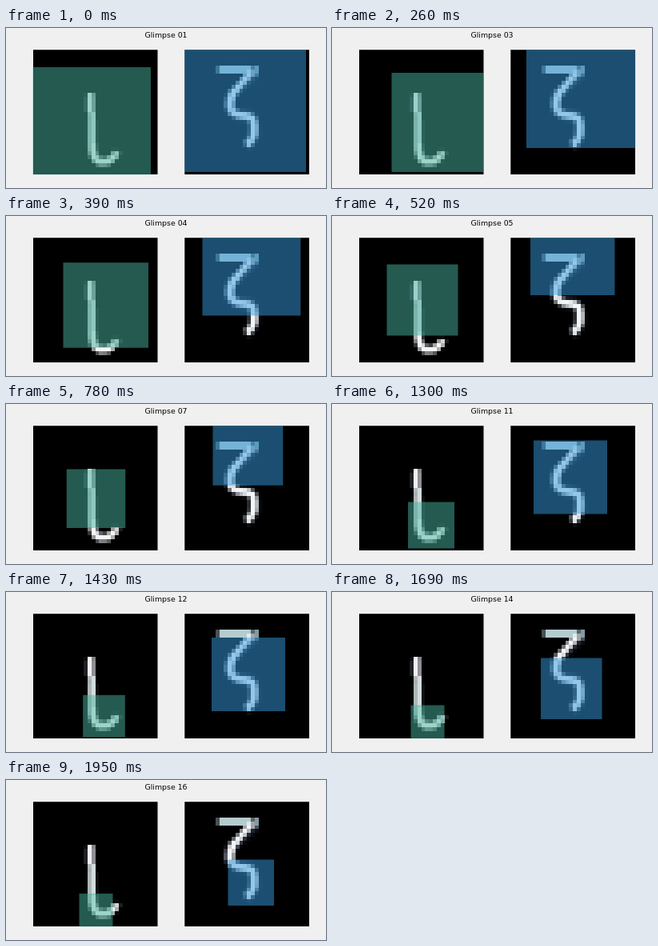
An HTML page with a canvas for the animation above (2080 ms loop, 400 by 200 pixels).

```html
<!DOCTYPE html>
<html>
<head>
<meta charset="utf-8">
<style>
  html, body { margin: 0; width: 100%; height: 100%; overflow: hidden; background: #f0f0f0; }
  canvas { position: absolute; left: 0; top: 0; }
  #title { position: absolute; left: 0; top: 3px; width: 400px; text-align: center;
    font: 9.4px/12px "DejaVu Sans", sans-serif; color: #000; }
</style>
</head>
<body>
<canvas id="stage" width="400" height="200"></canvas>
<div id="title"></div>
<script>
const STEP = 130, COUNT = 16, CELLS = 32, SIDE = 156, TOP = 27.3;
const ctx = document.getElementById('stage').getContext('2d');
const title = document.getElementById('title');

// Strokes are [colour, width, path] in cells; key glimpses are [number, x, y, size] in pixels.
const panels = [
  {
    left: 33.5,
    tint: 'rgba(72,180,160,.5)',
    glyph: glyph([
      ['rgba(95,100,130,.3)', 2.7, 'M14.6 12V16'],
      ['rgba(95,100,130,.3)', 2.6, 'M15.2 18V25Q15.5 28.5 18 28.5'],
      ['#f0eff2', 1.6, 'M14.75 11V16.2'],
      ['#d3dcdc', 1.8, 'M15.1 16V24'],
      ['#f4f6f6', 1.8, 'M15.2 24V25.5Q15.6 28.6 17.5 28.7H19Q20.2 28.2 21.7 26.3']
    ]),
    keys: [[1, 31, 49, 150], [3, 74.5, 56, 124], [5, 68.5, 60.5, 89], [9, 83, 102.5, 58],
      [11, 95, 122.5, 58], [14, 98.5, 141.5, 42], [16, 91.5, 142, 42]]
  },
  {
    left: 223.3,
    tint: 'rgba(54,156,224,.5)',
    glyph: glyph([
      ['rgba(95,100,130,.35)', 2.8, 'M18 6L12 11.5Q11.2 13 11.4 15L13 16.5L17 17.2L17.8 19V22L16 24.6'],
      ['#b4cccf', 2, 'M8.6 5H17.5'],
      ['#8699a2', 1, 'M18.5 4V6.5'],
      ['#f2f6f6', 1.8, 'M17.4 5.5L12.4 11Q11.5 12.5 11.6 14.5Q11.8 16.2 13.5 16.7L16.5 17.2Q17.8 17.6 17.8 19V21.5Q17.6 23 16 24.6']
    ]),
    keys: [[1, 219, 24, 156], [3, 243, 10, 140], [5, 248, -6.5, 105.5], [9, 269, 34.5, 70],
      [11, 252, 45.5, 92], [12, 257, 57, 92], [14, 261, 82.5, 76.5], [16, 277.5, 99.5, 57.5]]
  }
];

function glyph(strokes) {
  const tile = document.createElement('canvas');
  tile.width = tile.height = CELLS;
  const c = tile.getContext('2d');
  c.fillRect(0, 0, CELLS, CELLS);
  c.lineJoin = 'round';
  for (const [colour, width, path] of strokes) {
    c.strokeStyle = colour;
    c.lineWidth = width;
    c.stroke(new Path2D(path));
  }
  return tile;
}

function windowAt(keys, n) {
  const i = Math.max(1, keys.findIndex(k => k[0] >= n));
  const a = keys[i - 1], b = keys[i];
  const t = (n - a[0]) / (b[0] - a[0]);
  return [1, 2, 3].map(j => a[j] + (b[j] - a[j]) * t);
}

function drawPanel({ left, tint, glyph, keys }, n) {
  const [x, y, size] = windowAt(keys, n);
  ctx.save();
  ctx.beginPath();
  ctx.rect(left, TOP, SIDE, SIDE);
  ctx.clip();
  ctx.drawImage(glyph, left, TOP, SIDE, SIDE);
  ctx.fillStyle = tint;
  ctx.fillRect(x, y, size, size);
  ctx.restore();
}

function frame() {
  const n = Math.floor(performance.now() / STEP) % COUNT + 1;
  title.textContent = 'Glimpse ' + String(n).padStart(2, '0');
  ctx.imageSmoothingEnabled = false;
  ctx.clearRect(0, 0, 400, 200);
  panels.forEach(p => drawPanel(p, n));
  requestAnimationFrame(frame);
}
frame();
</script>
</body>
</html>
```
